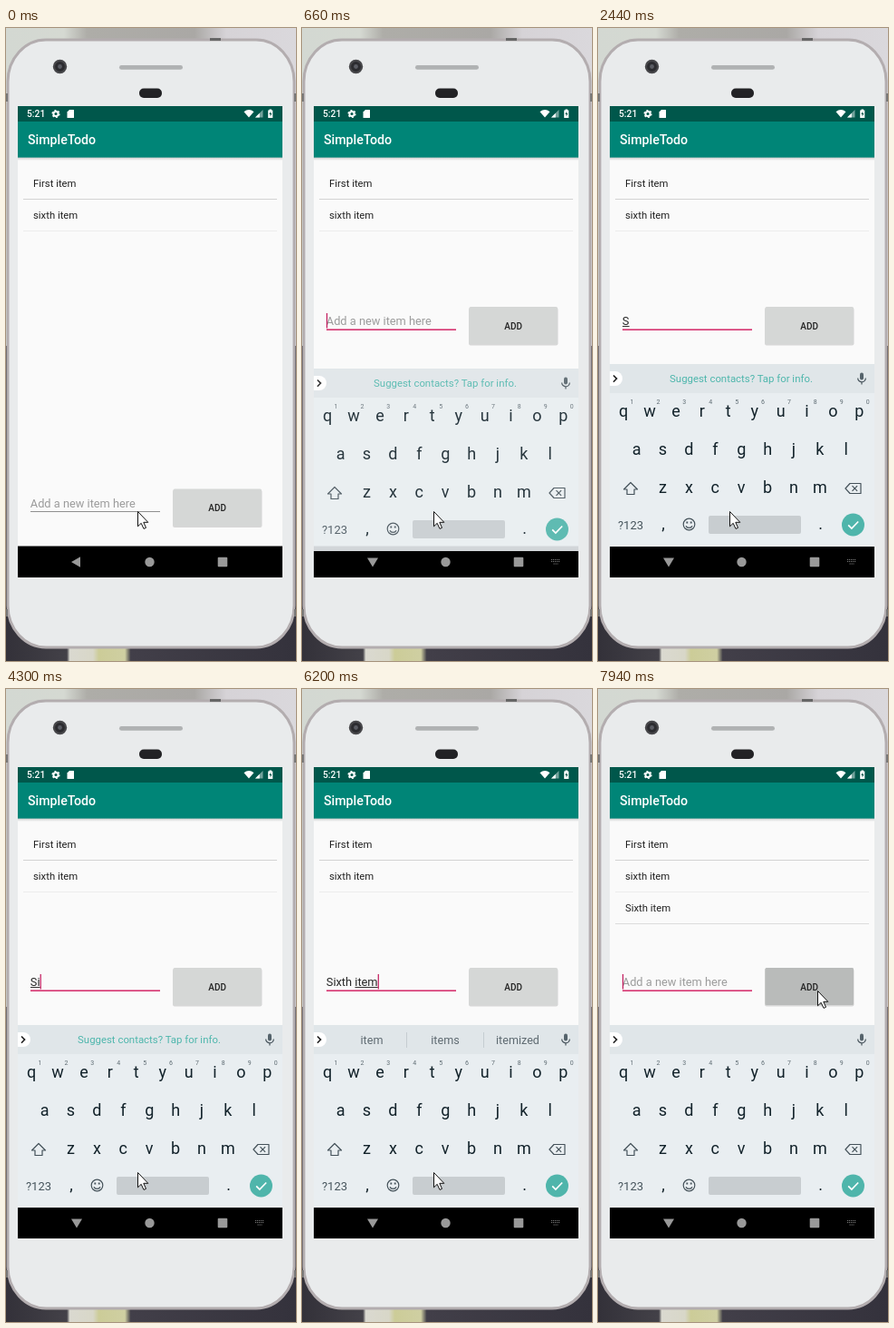
These frames come from a looping animation (320 px wide and 697 px high, 8000 ms). An HTML page:

```html
<!DOCTYPE html>
<html lang="en">
<head>
<meta charset="utf-8">
<title>Todo list on a phone</title>
<style>
html, body { margin: 0; width: 100%; height: 100%; overflow: hidden; }
svg { display: block; width: 100vw; height: 100vh; font-family: Roboto, sans-serif; }
text { white-space: pre; }
.mid { text-anchor: middle; }
.item { font-size: 11.3px; fill: #222; }
.field { font-size: 12.8px; }
.word { font-size: 12.6px; fill: #5f6b72; text-anchor: middle; }
.key { font-size: 18px; fill: #12222a; text-anchor: middle; }
.num { font-size: 7px; fill: #5f6c73; text-anchor: middle; }
.line { fill: none; stroke: #45525a; stroke-width: 1.2; stroke-linejoin: round; }
</style>
</head>
<body>
<svg viewBox="0 0 320 697" preserveAspectRatio="none">
  <defs>
    <linearGradient id="top">
      <stop offset="0" stop-color="#d3d8d2"/><stop offset=".2" stop-color="#d5d9d2"/>
      <stop offset=".28" stop-color="#aeada8"/><stop offset=".65" stop-color="#aaa8a5"/>
      <stop offset=".76" stop-color="#d6d3d7"/><stop offset="1" stop-color="#dad8dc"/>
    </linearGradient>
    <linearGradient id="bottom">
      <stop offset="0" stop-color="#333139"/><stop offset=".21" stop-color="#434148"/>
      <stop offset=".22" stop-color="#dad9d0"/><stop offset=".3" stop-color="#d8d7c8"/>
      <stop offset=".32" stop-color="#cccc98"/><stop offset=".41" stop-color="#cfcfa2"/>
      <stop offset=".43" stop-color="#423f49"/><stop offset="1" stop-color="#34323c"/>
    </linearGradient>
    <linearGradient id="shade" x2="0" y2="1">
      <stop offset="0" stop-color="#000" stop-opacity=".2"/>
      <stop offset="1" stop-color="#000" stop-opacity="0"/>
    </linearGradient>
    <clipPath id="screen"><rect x="13" y="86" width="292" height="519"/></clipPath>
    <clipPath id="face"><rect x="184.5" y="307" width="97.5" height="41" rx="1.5"/></clipPath>
  </defs>

  <rect width="320" height="350" fill="url(#top)"/>
  <rect y="350" width="320" height="347" fill="url(#bottom)"/>
  <rect x="2" y="13" width="316" height="669" rx="42" ry="46" fill="#e9ebec" stroke="#b3adaf" stroke-width="3"/>
  <rect x="225" y="11" width="12" height="3" fill="#666"/>
  <path d="M0 72h2v9h-2zM318 72h2v9h-2zM0 640h2v8h-2zM318 640h2v8h-2z" fill="#777"/>

  <circle cx="59.5" cy="42.5" r="7.7" fill="#47474a"/>
  <circle cx="59.5" cy="42.5" r="5.4" fill="#2c2c30"/>
  <circle cx="59.5" cy="42.5" r="2.4" fill="#5a5c63"/>
  <rect x="125" y="41" width="70" height="4.8" rx="2.4" fill="#b0b2b3"/>
  <rect x="147" y="66.5" width="25" height="10.5" rx="5" fill="#222225"/>

  <g clip-path="url(#screen)">
    <rect x="13" y="86" width="292" height="519" fill="#fafafa"/>
    <rect x="13" y="142" width="292" height="4" fill="url(#shade)"/>
    <rect x="13" y="86" width="292" height="17.5" fill="#00574b"/>
    <rect x="13" y="103" width="292" height="39.6" fill="#008577"/>
    <g fill="#fff">
      <text x="23" y="98" font-size="10.3" font-weight="500">5:21</text>
      <circle cx="55" cy="94.5" r="2.6" fill="none" stroke="#fff" stroke-width="2"/>
      <circle cx="55" cy="94.5" r="3.9" fill="none" stroke="#fff" stroke-width="1.4" stroke-dasharray="2 2.08"/>
      <path d="M70 90h4.5q.5 0 .5.5v8q0 .5-.5.5h-6.5q-.5 0-.5-.5v-6z"/>
      <path d="M262.5 92.300q5.5-4.500 11 0l-5.5 6.2z"/>
      <path d="M283.5 90v8.500h-8.500z" opacity=".45"/><path d="M279.8 93.700v4.800h-4.800z"/>
      <path d="M290.5 89.500h2.500v1h1.300v8.500h-5.100v-8.500h1.300z"/>
      <path d="M292.2 91.700l-1.800 3.300h1.200v2.500l1.800-3.400h-1.200z" fill="#00574b"/>
      <text x="24" y="128" font-size="14.2" font-weight="500">SimpleTodo</text>
    </g>

    <text class="item" x="30" y="175">First item</text>
    <text class="item" x="30" y="210">sixth item</text>
    <path d="M19 188.500h280" stroke="#d3d3d3"/>
    <path d="M19 223.500h280" stroke="#ececec"/>
    <g id="added">
      <text class="item" x="30" y="245">Sixth item</text>
      <path d="M19 258.500h280" stroke="#dcdcdc"/>
    </g>

    <g id="form">
      <text id="hint" class="field" x="26.8" y="327.3" fill="#9c9c9c">Add a new item here</text>
      <text id="typed" class="field" x="26.8" y="327" fill="#262626"></text>
      <rect id="compose" y="328" height="1" fill="#333"/>
      <rect id="rule" x="27" width="143"/>
      <rect id="caret" y="314" width="1.2" height="16.5" fill="#c2185b"/>
      <rect x="184" y="308" width="98.5" height="41.5" rx="2" fill="#000" opacity=".14"/>
      <rect x="184.5" y="307" width="97.5" height="41" rx="1.5" fill="#d5d7d6"/>
      <circle id="ripple" cx="242" cy="333" fill="#b9bbba" clip-path="url(#face)"/>
      <text class="mid" x="233.2" y="331.5" font-size="10" font-weight="500" fill="#222">ADD</text>
    </g>

    <rect x="13" y="570.5" width="292" height="35" fill="#000"/>

    <g id="board">
      <rect x="13" y="370" width="292" height="201" fill="#e9eef1"/>
      <rect x="13" y="370" width="292" height="32" fill="#e0e6e9"/>
      <path d="M13 378h6a8 8 0 0 1 0 16h-6z" fill="#fff"/>
      <path d="M17 382.500l3.600 3.600-3.600 3.600" fill="none" stroke="#222" stroke-width="1.6"/>
      <text id="notice" class="mid" x="158" y="390.3" font-size="11.4" fill="#4db6ac">Suggest contacts? Tap for info.</text>
      <g id="words">
        <path d="M115.5 378v17M200.5 378v17" stroke="#c5cdd1"/>
        <text class="word" x="77" y="390.8"></text>
        <text class="word" x="158" y="390.8"></text>
        <text class="word" x="238" y="390.8"></text>
      </g>
      <rect x="289" y="379.5" width="4" height="8" rx="2" fill="#55636b"/>
      <path class="line" d="M286.7 385.500a4.300 4.300 0 0 0 8.600 0M291 389.800v2.700"/>
      <g id="keys"></g>
      <path class="line" d="M36 500.500l7.500 7.500h-3.500v5.500h-8v-5.500h-3.500z"/>
      <path class="line" d="M278 501.500h12v11h-12l-5-5.500zM280.5 504.200l5.600 5.600M286.100 504.200l-5.600 5.600"/>
      <text class="mid" x="36" y="551.5" font-size="13" fill="#45535b">?123</text>
      <circle class="line" cx="100.5" cy="546.5" r="6.3"/>
      <path class="line" d="M97 548.300a3.700 3.200 0 0 0 7 0"/>
      <path d="M97.4 543.600h1.800v2h-1.800zM101.800 543.600h1.800v2h-1.800z" fill="#45525a"/>
      <rect x="122" y="537" width="102" height="20" rx="2" fill="#c8cdd0"/>
      <circle cx="281.5" cy="547" r="12.5" fill="#4fb5ab"/>
      <path d="M276.2 547.300l3.700 3.700 7.300-7.500" fill="none" stroke="#fff" stroke-width="1.7"/>
    </g>

    <g fill="#999">
      <path id="back" d="M72 588l10-5.700v11.400z"/>
      <path id="down" d="M72 583.500h12l-6 10z"/>
      <circle cx="158.5" cy="588" r="5.2"/>
      <rect x="233.7" y="582.7" width="10.6" height="10.6" rx="1"/>
      <path id="switch" d="M275 585.500h10M275 587.500h10M277.500 590h5" stroke="#777" stroke-dasharray="1.2 .8"/>
    </g>
  </g>

  <path id="mouse" d="M.5.500v16.300l3.700-3.500 2.800 6.100 2.500-1.100-2.700-6h5z" fill="#fff" stroke="#111" stroke-linejoin="round"/>
</svg>
<script>
const LOOP = 8000;
const $ = id => document.getElementById(id);
const show = (id, on) => $(id).setAttribute("display", on ? "inline" : "none");
const set = (id, attrs) => {
  for (const k in attrs) $(id).setAttribute(k, attrs[k]);
};

// Keyboard letters
const label = (cls, x, y, s) => `<text class="${cls}" x="${x}" y="${y}">${s}</text>`;
const row = (s, x, y) => [...s].map((c, i) => label("key", x + 28.9 * i, y, c)).join("");
$("keys").innerHTML =
  row("qwertyuiop", 28.2, 428) + row("asdfghjkl", 42.6, 470) + row("zxcvbnm", 71.5, 512) +
  [..."1234567890"].map((c, i) => label("num", 37.5 + 28.9 * i, 414, c)).join("") +
  label("key", 72, 551.5, ",") + label("key", 245.5, 551.5, ".");

// Each step changes part of the state; "from" is where the composing word begins
const steps = [
  [0, { text: "", from: 0, caret: 0, focus: 0, open: 0, lift: 0, fade: 1, words: null, ripple: 0, added: 0, mouse: [145, 532] }],
  [270, { focus: 1, caret: 1 }],
  [420, { open: 1, lift: 22, fade: .3 }],
  [540, { lift: 12, fade: .65 }],
  [660, { lift: 5, fade: .9 }],
  [810, { lift: 1, fade: 1, caret: 0 }],
  [930, { lift: 0 }],
  [1330, { caret: 1 }],
  [1860, { caret: 0 }],
  [2010, { text: "S", caret: 1 }],
  [2440, { caret: 0 }],
  [2990, { caret: 1 }],
  [3490, { text: "" }],
  [4020, { caret: 0 }],
  [4170, { text: "S", caret: 1 }],
  [4300, { text: "Si" }],
  [4420, { words: "Si Sir Since" }],
  [4570, { text: "Six", words: "Six Sixth Sixty" }],
  [4690, { text: "Sixt", words: "Sixt Sixth Sixty" }],
  [4810, { text: "Sixth", words: "Sixth Sixty Sixths" }],
  [5110, { text: "Sixth ", from: 6, words: "form and grade" }],
  [5520, { text: "Sixth i", words: "I is in" }],
  [5900, { text: "Sixth it", words: "it is its" }],
  [6050, { text: "Sixth ite", words: "ite item items" }],
  [6200, { text: "Sixth item", words: "item items itemized" }],
  [6600, { caret: 0 }],
  [6880, { mouse: [152, 518] }],
  [7000, { mouse: [181, 436] }],
  [7150, { mouse: [227, 344], caret: 1 }],
  [7400, { mouse: [234, 338] }],
  [7550, { mouse: [242, 332], ripple: 8 }],
  [7670, { ripple: 21, caret: 0 }],
  [7790, { ripple: 34, words: "" }],
  [7940, { text: "", from: 0, caret: 1, ripple: 90, added: 1 }]
];

const stateAt = t => Object.assign({}, ...steps.filter(s => s[0] <= t).map(s => s[1]));

function draw(t) {
  const s = stateAt(t);
  const typed = $("typed");
  typed.textContent = s.text;
  const width = n => n ? typed.getSubStringLength(0, n) : 0;
  const end = width(s.text.length), start = width(s.from);
  show("hint", !s.text);
  set("compose", { x: 27 + start, width: Math.max(0, end - start) });
  set("caret", { x: 26.9 + end });
  show("caret", s.caret);
  set("rule", s.focus
    ? { y: 331.4, height: 1.6, fill: "#d6336f" }
    : { y: 331.5, height: 1, fill: "#909090" });
  set("form", { transform: `translate(0 ${s.open ? 0 : 200.5})` });
  set("ripple", { r: s.ripple });
  show("added", s.added);

  show("board", s.open);
  set("board", { transform: `translate(0 ${s.lift})`, opacity: s.fade });
  show("notice", s.words === null);
  show("words", s.words);
  const words = (s.words || "").split(" ");
  document.querySelectorAll(".word").forEach((el, i) => { el.textContent = words[i] || ""; });
  show("back", !s.open);
  show("down", s.open);
  show("switch", s.open);
  set("mouse", { transform: `translate(${s.mouse})` });
}

const begin = performance.now();
function tick() {
  draw((performance.now() - begin) % LOOP);
  requestAnimationFrame(tick);
}
tick();
</script>
</body>
</html>
```
